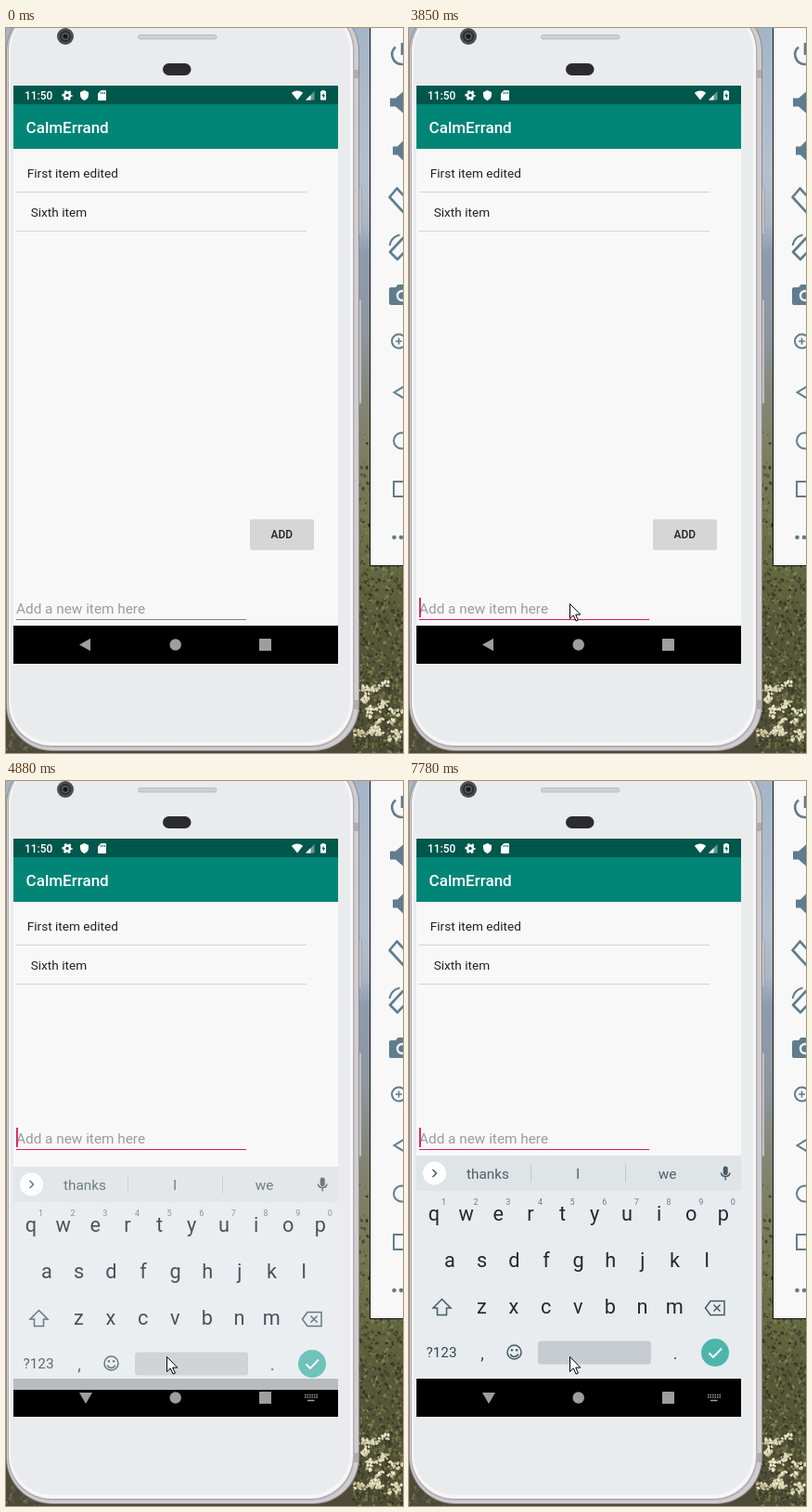
Recreate the animation shown at these times as an HTML page with a canvas. Size 428 px wide and 780 px high, loop 8 s.

```html
<!DOCTYPE html>
<html lang="en">
<head>
<meta charset="utf-8">
<title>Phone list demo</title>
<style>
  html, body { margin: 0; width: 100%; height: 100%; overflow: hidden; background: #5a5842; }
  canvas, svg { position: absolute; left: 0; top: 0; width: 428px; height: 780px; display: block; }
  text { font-family: Roboto, "Noto Sans", sans-serif; }
  .item { font-size: 13.62px; fill: #222; }
  .mid { text-anchor: middle; }
  .line { fill: none; stroke-linecap: butt; stroke-linejoin: miter; }
</style>
</head>
<body>
<canvas id="photo" width="428" height="780"></canvas>
<svg viewBox="0 0 428 780">
  <defs>
    <clipPath id="screenClip"><rect x="8" y="62" width="350" height="622"/></clipPath>
  </defs>

  <!-- phone body -->
  <g id="phone">
    <rect x="378" y="170" width="5" height="52" rx="1.5" fill="#cfcbcd" stroke="#9a9698" stroke-width=".8"/>
    <rect x="378" y="292" width="5" height="112" rx="1.5" fill="#cfcbcd" stroke="#9a9698" stroke-width=".8"/>
    <rect x="0" y="-25" width="381" height="803" rx="50" fill="#8f8b8d"/>
    <rect x="1" y="-24" width="379" height="801" rx="49" fill="#d0cccf"/>
    <rect x="2" y="-23" width="373.500" height="797" rx="47" fill="#b3afb2"/>
    <rect x="3" y="-22" width="371" height="794" rx="46" fill="#f6f6f7"/>
    <rect x="5" y="-20" width="366" height="788" rx="44" fill="#e9ebed"/>
    <path d="M375 45h5v9h-5zM375 723h5v10h-5z" fill="#b0abae"/>
    <circle cx="64" cy="9" r="9" fill="#4b4c4f"/>
    <circle cx="64" cy="9" r="6" fill="#2c2d30"/>
    <circle cx="64" cy="9" r="4" fill="#5d6064"/>
    <circle cx="64" cy="9" r="2.600" fill="#17181a"/>
    <rect x="142.500" y="7.500" width="84.500" height="4.500" rx="2.250" fill="#cfd0d2" stroke="#b3b4b6" stroke-width=".8"/>
    <rect x="169" y="38" width="30.500" height="13" rx="6.500" fill="#2b2b2d"/>
  </g>

  <g clip-path="url(#screenClip)">
    <rect x="8" y="62" width="350" height="622" fill="#f8f8f8"/>
    <rect x="8" y="82" width="350" height="48" fill="#008577"/>
    <rect x="8" y="62" width="350" height="20" fill="#00574b"/>

    <!-- status bar -->
    <g fill="#fff">
      <text x="20" y="76.500" font-size="11.920" font-weight="500">11:50</text>
      <circle cx="66" cy="72.500" r="3" fill="none" stroke="#fff" stroke-width="2.500"/>
      <circle cx="66" cy="72.500" r="4.700" fill="none" stroke="#fff" stroke-width="1.800" stroke-dasharray="2.460" stroke-dashoffset="1.230"/>
      <path d="M84.500 67l-4.500 2v3c0 2.800 1.900 5.200 4.500 6 2.600-.8 4.500-3.200 4.500-6v-3z"/>
      <path d="M102.500 67h4.500q1 0 1 1v9q0 1-1 1h-7q-1 0-1-1v-6.500z"/>
      <path d="M102.500 69v2M104.500 69v2M106.500 69v2" stroke="#00574b" stroke-width=".9"/>
      <path d="M314 77.500l-6.200-7.700q6.200-4.600 12.400 0z"/>
      <path d="M323 77.500h9.500v-9.500z" opacity=".4"/>
      <path d="M323 77.500h5.500v-5.500z"/>
      <path d="M340.500 67h3v1h1.500v9.500h-6v-9.500h1.500z"/>
      <path d="M342.600 69.500l-2.200 3.800h1.500v2.700l2.200-3.800h-1.500z" fill="#00574b"/>
    </g>
    <text x="21.600" y="113" font-size="17.030" font-weight="500" fill="#fff">CalmErrand</text>

    <!-- list -->
    <text class="item" x="22.700" y="161">First item edited</text>
    <text class="item" x="26.700" y="202.700">Sixth item</text>
    <path d="M10.500 176.500H324M10.500 218.500H324" stroke="#d4d4d4"/>

    <g id="addButton">
      <rect x="263" y="529" width="69" height="32.500" rx="2" fill="#cbcaca"/>
      <rect x="263" y="528.500" width="69" height="32.500" rx="2" fill="#d7d6d6"/>
      <text class="mid" x="297.300" y="549" font-size="11.920" font-weight="500" fill="#222">ADD</text>
    </g>

    <g id="field">
      <text x="11" y="630" font-size="15.330" fill="#9c9c9c">Add a new item here</text>
      <rect id="rule" x="11" y="636" width="248" height="1"/>
      <rect id="caret" x="11" y="613" width="1.800" height="21" fill="#d81b60"/>
    </g>

    <rect x="8" y="643" width="350" height="41"/>

    <!-- keyboard -->
    <g id="keyboard">
      <rect x="8" y="403" width="350" height="240" fill="#e8ecef"/>
      <rect x="8" y="403" width="350" height="38" fill="#dfe4e7"/>
      <circle cx="27.500" cy="422" r="12.500" fill="#fff"/>
      <path class="line" d="M25.500 418l4 4-4 4" stroke="#455a64" stroke-width="1.500"/>
      <path d="M131.500 412v20M233.500 412v20" stroke="#c3c9cd"/>
      <g class="mid" font-size="15.330" fill="#4f5f67">
        <text x="85" y="427.500">thanks</text>
        <text x="182" y="427.500">I</text>
        <text x="278.500" y="427.500">we</text>
      </g>
      <rect x="338.700" y="414.500" width="5" height="9.500" rx="2.500" fill="#455a64"/>
      <path class="line" d="M336.300 421.500a5 5 0 0 0 9.800 0M341.200 426v3.500" stroke="#455a64" stroke-width="1.400"/>
      <g id="keys" class="mid" font-size="21.700" fill="#1f2b31"></g>
      <g class="line" stroke="#455a64" stroke-width="1.500">
        <path d="M35.500 557.500l9.500 9.500h-4.500v7.500h-10V567H26z"/>
        <path d="M319.500 567l5.500-7.500h15v15h-15zM328.500 563.500l7 7M335.500 563.500l-7 7"/>
        <circle cx="113.500" cy="614.500" r="7.500"/>
        <path d="M109.300 616.500a4.500 4.500 0 0 0 8.400 0"/>
      </g>
      <circle cx="110.900" cy="612.300" r="1.200" fill="#455a64"/>
      <circle cx="116.100" cy="612.300" r="1.200" fill="#455a64"/>
      <text class="mid" x="35" y="620" font-size="15.300" fill="#37474f">?123</text>
      <text class="mid" x="79" y="622" font-size="18" fill="#37474f">,</text>
      <text class="mid" x="287" y="622" font-size="18" fill="#37474f">.</text>
      <rect x="139" y="602.500" width="122" height="25" rx="3" fill="#c7ccd0"/>
      <circle cx="330" cy="615" r="15" fill="#4db6ac"/>
      <path class="line" d="M323.500 615.500l4.500 4.500 9-9.500" stroke="#fff" stroke-width="1.900"/>
    </g>

    <!-- navigation bar -->
    <g fill="#fff" opacity=".62">
      <path id="back" d="M79 663.500l12-6.800v13.600z"/>
      <g id="imeNav">
        <path d="M79 658h14l-7 12z"/>
        <path d="M322 660.500h14M322 663h14" stroke="#fff" stroke-width="1.500" stroke-dasharray="1.500 1"/>
        <path d="M325 666.500h7.500" stroke="#fff" stroke-width="1.500"/>
      </g>
      <circle cx="182.700" cy="663.500" r="6.200"/>
      <rect x="273" y="657" width="13" height="13" rx=".5"/>
    </g>
  </g>

  <!-- emulator side panel -->
  <rect x="392.500" y="-2" width="40" height="580.500" fill="#f8f8f9" stroke="#111"/>
  <g class="line" stroke="#5f7d8e" stroke-width="2.600">
    <path d="M420 20.500a10.500 10.500 0 0 0 6.500 18.500h3M427 16v13"/>
    <path d="M413.500 182l8-9.500 17 18.500-8 9.500z" stroke-linejoin="round"/>
    <path d="M414 241l14-15 8 8-14 15z" stroke-linejoin="round"/>
    <path d="M413.500 234q1.500-9 11-11.500" stroke-width="2"/>
    <circle cx="423.500" cy="337" r="7.500" stroke-width="2"/>
    <path d="M420 337h7M423.500 333.500v7" stroke-width="1.700"/>
    <path d="M418.500 392l14-8.500v17z" stroke-width="2"/>
    <circle cx="426.500" cy="444" r="8.500" stroke-width="2"/>
    <rect x="418" y="488" width="16" height="16" stroke-width="2"/>
  </g>
  <g fill="#5f7d8e">
    <path d="M414 75.500h6l8-7v23l-8-7h-6zM417 127.500h5l7-7v23l-7-7h-5z"/>
    <path d="M415 279h5l2.500-3H432v22H415q-2 0-2-2v-15q0-2 2-2z"/>
    <circle cx="418.500" cy="548" r="2.300"/>
    <circle cx="426" cy="548" r="2.300"/>
  </g>
  <circle cx="427" cy="288" r="5" fill="#5f7d8e" stroke="#f8f8f9" stroke-width="2.400"/>

  <path id="cursor" d="M.5.500v16l3.800-3.600 2.800 6.100 2.300-1-2.700-5.900h5.100z" fill="#fff" stroke="#000" stroke-width="1"/>
</svg>

<script>
const $ = id => document.getElementById(id);
const show = (id, on) => $(id).setAttribute('visibility', on ? 'visible' : 'hidden');
const move = (id, x, y) => $(id).setAttribute('transform', `translate(${x} ${y})`);

// Landscape: soft gradient, leafy specks and pale flowers
function paintPhoto() {
  const c = $('photo').getContext('2d');
  let seed = 11;
  const rnd = () => (seed = seed * 16807 % 2147483647) / 2147483647;
  const pick = list => list[Math.floor(rnd() * list.length)];
  const dot = (x, y, r, color) => {
    c.fillStyle = color;
    c.beginPath();
    c.ellipse(x, y, r, r * .7, rnd() * 3, 0, 7);
    c.fill();
  };
  const sky = c.createLinearGradient(0, 0, 0, 780);
  [[0, '#a3b5c8'], [.2, '#b3c1ce'], [.27, '#a9b7c5'], [.31, '#8c9cae'], [.42, '#8d97a0'],
   [.5, '#85887a'], [.58, '#7d7f62'], [.7, '#6d7148'], [.82, '#58593a'], [1, '#4c4a38']]
    .forEach(([at, color]) => sky.addColorStop(at, color));
  c.fillStyle = sky;
  c.fillRect(0, 0, 428, 780);
  for (let i = 0; i < 1300; i++) {
    const y = 430 + 350 * Math.sqrt(rnd());
    dot(374 + rnd() * 54, y, .7 + rnd() * 1.6, pick(['#41442b', '#4f5433', '#69703f', '#7d8050', '#383825']));
  }
  for (let i = 0; i < 60; i++) dot(rnd() * 40, 740 + rnd() * 40, 2, pick(['#4a4538', '#6f6857', '#5a5544']));
  for (let i = 0; i < 24; i++) {
    const x = 374 + rnd() * 54, y = 682 + 86 * Math.sqrt(rnd());
    for (let k = 0; k < 9; k++)
      dot(x + rnd() * 9 - 4, y + rnd() * 6 - 3, 1.2 + rnd(), pick(['#dfd9ba', '#c3bb95', '#ece7d0']));
  }
}

function buildKeys() {
  const rows = [['qwertyuiop', 27, 472.5], ['asdfghjkl', 44, 522.5], ['zxcvbnm', 78.3, 572.5]];
  let out = '';
  rows.forEach(([letters, x0, y], row) => [...letters].forEach((ch, i) => {
    const x = x0 + i * 34.65;
    out += `<text x="${x}" y="${y}">${ch}</text>`;
    if (!row) out += `<text x="${x + 10.5}" y="456" font-size="9" fill="#6b7a82">${(i + 1) % 10}</text>`;
  }));
  $('keys').innerHTML = out;
}

const LOOP = 8000;
// keys: keyboard offset and opacity
const steps = [
  [0, { cursor: null, focus: false, caret: false, ime: false, raised: false, keys: null }],
  [500, { cursor: [222, 660] }],
  [2870, { cursor: [216, 652] }],
  [3020, { cursor: [173, 619] }],
  [3580, { focus: true }],
  [3850, { caret: true }],
  [4150, { ime: true }],
  [4290, { caret: false }],
  [4440, { raised: true }],
  [4730, { keys: [60, .53] }],
  [4880, { keys: [12, .8], caret: true }],
  [5040, { keys: [0, 1] }],
  [5180, { caret: false }],
  [5710, { caret: true }],
  [6390, { caret: false }],
  [6820, { caret: true }],
  [7350, { caret: false }],
  [7780, { caret: true }]
];

function render(time) {
  const s = Object.assign({}, ...steps.filter(([at]) => at <= time).map(([, change]) => change));
  show('cursor', s.cursor);
  if (s.cursor) move('cursor', ...s.cursor);
  show('addButton', !s.raised);
  show('caret', s.caret);
  show('back', !s.ime);
  show('imeNav', s.ime);
  move('field', 0, s.raised ? -240 : 0);
  $('rule').setAttribute('fill', s.focus ? '#d81b60' : '#858585');
  show('keyboard', s.keys);
  if (s.keys) {
    move('keyboard', 0, s.keys[0]);
    $('keyboard').setAttribute('opacity', s.keys[1]);
  }
}

paintPhoto();
buildKeys();
render(0);
const start = performance.now();
function tick() {
  render((performance.now() - start) % LOOP);
  requestAnimationFrame(tick);
}
requestAnimationFrame(tick);
</script>
</body>
</html>
```
